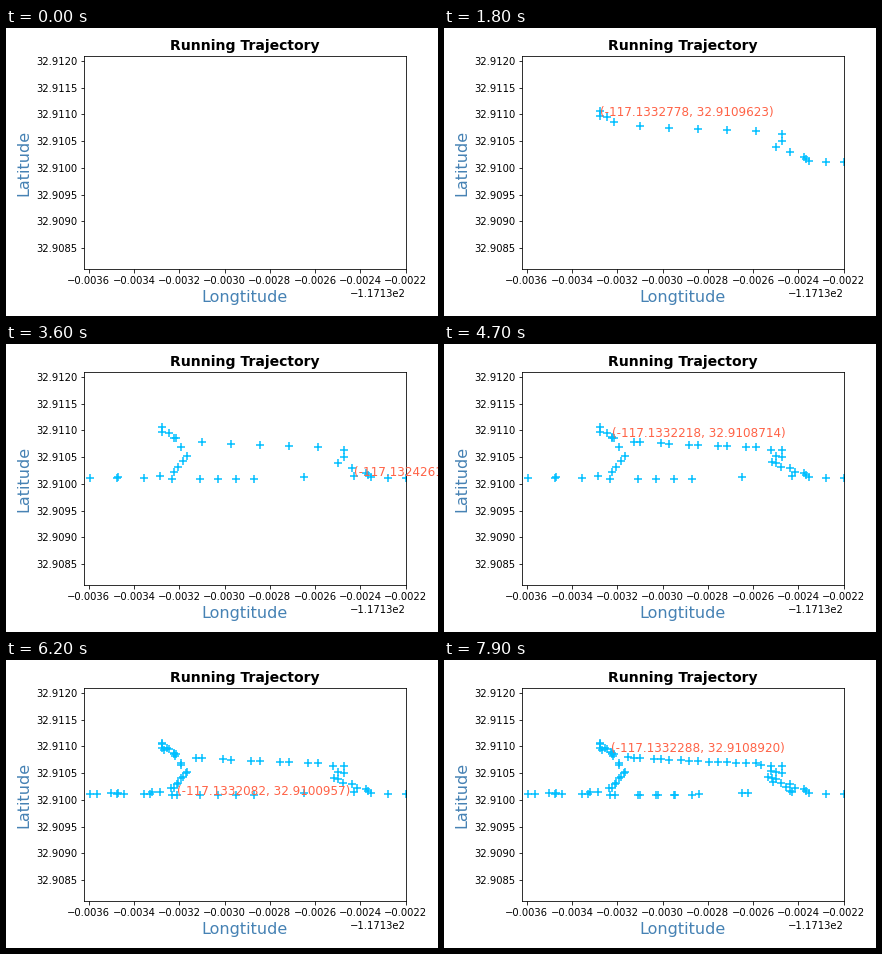
These frames come from a looping animation (432x288 px, 8000 ms). A matplotlib script:

```python
import matplotlib.pyplot as plt
import numpy as np
from matplotlib.animation import FuncAnimation

W, H, DPI = 432, 288, 72
FRAMES, INTERVAL = 80, 100
LON0, LAT0, UNIT = -117.1322, 32.91, 1e-7

# Corners of the run: (step, units west of LON0, units north of LAT0)
CORNERS = np.array([
    (1, 2, 1002), (3, 1543, 1371), (5, 1764, 2122), (7, 2999, 3812),
    (8, 2734, 4939), (9, 2734, 6254), (10, 3881, 6817), (14, 8996, 7756),
    (15, 10143, 8507), (17, 10771, 10573), (18, 10778, 9623),
    (19, 10231, 8503), (21, 9658, 5127), (24, 10231, 2310),
    (25, 10849, 1559), (26.8, 14200, 1183), (28, 12762, 1167),
    (31, 9085, 880), (34, 6703, 996), (36, 2261, 1559), (36.8, 1764, 2122),
])
LAP_START, LAP = 5, 31.8        # the route closes on itself at LAP_START
PIVOT, TIGHTEN = 10600, 0.03    # each lap is run a little narrower


def run(steps):
    """Positions (lon, lat) after each step, one lap after another."""
    laps = np.maximum((steps - LAP_START) // LAP, 0)
    t = steps - laps * LAP
    west = np.interp(t, CORNERS[:, 0], CORNERS[:, 1])
    north = np.interp(t, CORNERS[:, 0], CORNERS[:, 2])
    west += TIGHTEN * laps * (PIVOT - west)
    return np.column_stack([LON0 - west * UNIT, LAT0 + north * UNIT])


track = run(np.arange(1, FRAMES))

fig, ax = plt.subplots(figsize=(W / DPI, H / DPI), dpi=DPI)
ax.set_xlim(-117.13362, -117.1322)
ax.set_ylim(32.9081, 32.9121)
ax.set_title("Running Trajectory", fontsize=14, fontweight="bold")
ax.set_xlabel("Longtitude", fontsize=16, color="steelblue")
ax.set_ylabel("Latitude", fontsize=16, color="steelblue")
fig.tight_layout()

marks = ax.scatter([], [], s=64, marker="+", color="deepskyblue",
                   linewidths=1.5)
label = ax.text(LON0, LAT0, "", fontsize=12, color="tomato")


def draw(frame):
    """Show the first `frame` fixes and label the newest one."""
    marks.set_offsets(track[:frame])
    if frame:
        lon, lat = track[frame - 1]
        label.set_position((lon, lat))
        label.set_text(f"({lon:.7f}, {lat:.7f})")
    else:
        label.set_text("")
    return marks, label


anim = FuncAnimation(fig, draw, frames=FRAMES, interval=INTERVAL,
                     init_func=lambda: draw(0), repeat=True, repeat_delay=0)
plt.show()
```
